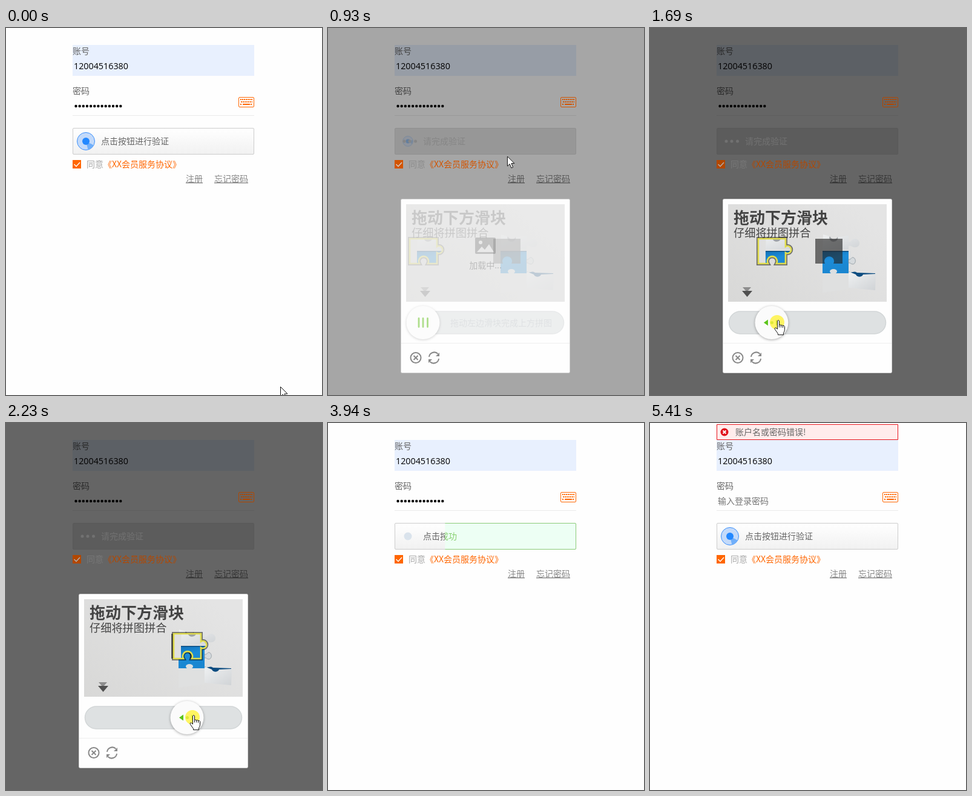
Write an HTML page that moves like this. It is 522 by 606 pixels and loops after 5.5 s.

```html
<!DOCTYPE html>
<html lang="zh">
<head>
<meta charset="utf-8">
<style>
html, body { margin: 0; width: 100%; height: 100%; overflow: hidden; background: #fefefe; }
svg { display: block; width: 522px; height: 606px; font: 14px "Noto Sans CJK SC", sans-serif; fill: #666; }
.orange { fill: #f60; }
.line { fill: none; stroke-width: 2; }
.link { fill: #888; text-decoration: underline; }
#account { font: 14.3px "Open Sans", "Noto Sans", sans-serif; fill: #000; }
#knob circle { filter: drop-shadow(0 1px 2px #0005); }
</style>
</head>
<body>
<svg viewBox="0 0 522 606">
  <defs>
    <linearGradient id="button" x2="0" y2="1"><stop stop-color="#fff"/><stop offset="1" stop-color="#f1f1f1"/></linearGradient>
    <linearGradient id="paper" y1="1" x2="1" y2=".3"><stop stop-color="#d8d8d7"/><stop offset="1" stop-color="#e4e4e4"/></linearGradient>
    <linearGradient id="white" x2="1" y2="1"><stop stop-color="#eef0f1"/><stop offset="1" stop-color="#d0d3d6"/></linearGradient>
    <linearGradient id="blue" x2=".3" y2="1"><stop stop-color="#1273ba"/><stop offset=".4" stop-color="#1c8cd9"/><stop offset="1" stop-color="#1a86d0"/></linearGradient>
    <clipPath id="wipe"><rect id="wipeBox" y="165" width="300" height="44"/></clipPath>
    <path id="tile" d="M135 348h45v13a6 6 0 1 1 0 10v18h-15a8 8 0 1 0-14 0h-16z"/>
    <clipPath id="tileClip"><use href="#tile"/></clipPath>
    <g id="scene">
      <path fill="url(#paper)" d="M129 291h262v161H129z"/>
      <path fill="url(#white)" d="M286 341l11 3a7 6 0 1 0 13 1l18-2v10c4 2 5-6 12-5 8 2 8 13 0 14-6 1-8-4-12-2v6h-43z"/>
      <path fill="#9ea2a5" d="M297 344a7 6 0 1 0 13 1c-3 5-9 6-13-1z"/>
      <path fill="#dfe0e0" d="M285 405h43v26l-43 6z"/>
      <path fill="url(#white)" d="M328 404l45 1-1 28-44-4z"/>
      <path fill="url(#blue)" d="M285 369h43v36h-43z"/>
      <path fill="#d5dadd" stroke="#8b959c" stroke-width=".8" d="M328 382c5 1 4-4 8-3 5 2 4 11-1 11-4 0-3-3-7-2z"/>
      <path fill="#0d4c80" d="M285 368h43v1.500h-43zM328 402c5 4 8-2 14 2l30 1v1l-20 1c-2 5-10 5-12 0z"/>
      <ellipse cx="303" cy="402" rx="6" ry="4" fill="#dcdfe1"/>
    </g>
  </defs>

  <g id="page">
    <path fill="#e8f0fe" d="M110 28h300v51H110z"/>
    <text x="110" y="43">账号</text>
    <text id="account" x="112" y="68">12004516380</text>
    <text x="110" y="109">密码</text>
    <g id="dots" fill="#000"></g>
    <text id="hint" x="112" y="134" fill="#757575">输入登录密码</text>
    <path fill="#ebebeb" d="M110 144h300v1H110z"/>
    <rect id="face" x="110.5" y="165.5" width="299" height="43" rx="1.5"/>
    <g id="radar">
      <circle r="14.5" fill="#c3dafa" stroke="#3a8ffb"/>
      <path id="beam" fill="#70affa" d="M0 0L13.2-6A14.5 14.5 0 0 1 13.2 6z"/>
      <circle r="6" fill="#2388ff"/>
    </g>
    <circle id="seed" cx="132" cy="187" r="6.5" fill="#dae3ec"/>
    <text id="prompt" x="157" y="192">点击按钮进行验证</text>
    <g id="passed" clip-path="url(#wipe)">
      <rect x="110.5" y="165.5" width="299" height="43" rx="1.5" fill="#edfff4" stroke="#8acb78"/>
      <circle cx="132" cy="187" r="10" class="line" stroke="#86cf6e"/>
      <path d="M127 187l4 4 7-8" class="line" stroke="#86cf6e"/>
      <text x="157" y="192" fill="#86cf6e">验证成功</text>
    </g>
    <text x="297" y="254" class="link">注册</text>
    <text x="344" y="254" class="link">忘记密码</text>
    <g id="error">
      <path fill="#ffecec" stroke="#e8141c" d="M110.5 2.5h299v25h-299z"/>
      <circle cx="123" cy="15" r="6.5" fill="#e1101a"/>
      <path class="line" stroke="#fff" d="M120.5 12.5l5 5m0-5l-5 5"/>
      <text x="141" y="20">账户名或密码错误!</text>
    </g>
  </g>

  <rect id="shade" width="522" height="606" fill="#000"/>
  <g id="accents" class="orange">
    <g id="waiting" fill="#a2a2a2">
      <circle cx="126" cy="187" r="2.5"/><circle cx="135" cy="187" r="2.5"/><circle cx="144.500" cy="187" r="2.5"/>
      <text x="157" y="192">请完成验证</text>
    </g>
    <rect x="384.500" y="114.500" width="25" height="16" rx="1.5" fill="none" stroke="#f60"/>
    <path fill="none" stroke="#f60" stroke-width="2" stroke-dasharray="2 1" d="M387 118h20M388 122h19M387 126h3M404 126h3"/>
    <path d="M391 125h12v2h-12zM110 218h14v14h-14z"/>
    <path fill="none" stroke="#fff" stroke-width="1.4" d="M112.500 225l3.500 3.500 6-6.500"/>
    <text x="133" y="230" fill="#aaa">同意</text><text x="161" y="230">《XX会员服务协议》</text>
  </g>

  <g id="modal">
    <rect x="120.500" y="282.500" width="279" height="287" rx="2" fill="#fefefe" stroke="#d1d1d1"/>
    <path fill="#ececec" d="M129 291h262v161H129z"/>
    <path fill="#bdbdbd" fill-rule="evenodd" d="M245 346h30q2 0 2 2v23q0 2-2 2h-30q-2 0-2-2v-23q0-2 2-2zm1 24h28l-8-13-7 9-5-5zm3-16a3 3 0 1 0 6 0 3 3 0 1 0-6 0z"/>
    <text x="260" y="397" text-anchor="middle" fill="#b5b5b5">加载中...</text>
    <g id="picture">
      <use href="#scene"/>
      <text x="138" y="322.500" font-size="26" font-weight="700" fill="#444">拖动下方滑块</text>
      <text x="138" y="344.500" font-size="18.2" fill="#444">仔细将拼图拼合</text>
      <path fill="#8d8d8d" d="M153 428h14l-7 8z"/><path fill="#505050" d="M152 434h17l-8.500 10z"/>
      <g id="puzzle">
        <path fill="#222" fill-opacity=".62" d="M273 348h45v41h-15a8 8 0 1 0-14 0h-16z"/>
        <g id="piece">
          <use href="#tile" fill="none" stroke="#000" stroke-opacity=".5" stroke-width="6"/>
          <g clip-path="url(#tileClip)"><use href="#scene" x="-138"/></g>
          <use href="#tile" fill="none" stroke="#e0dc4c" stroke-width="2.600"/>
        </g>
      </g>
      <path id="result" fill="#68c07a" d="M129 450h262v2H129z"/>
    </g>
    <g id="slider">
      <rect x="130.500" y="468" width="259" height="37" rx="18.500" fill="#dee1e2" stroke="#d2d6d7" stroke-width="1.500"/>
      <text id="tip" x="202" y="491.500" fill="#98a0a6">拖动左边滑块完成上方拼图</text>
      <g id="knob">
        <circle cx="157" cy="486.500" r="27.500" fill="#fbfbfb"/>
        <path id="bars" stroke="#61bf1b" stroke-width="2.800" stroke-linecap="round" d="M150 479.500v14m7-14v14m7.500-14v14"/>
        <path id="arrows" fill="#5cc41a" d="M144 486.500l7-5v10zM171 486.500l-7-5v10zM155 486.500a2.500 2.500 0 1 0 5 0 2.500 2.500 0 1 0-5 0z"/>
      </g>
    </g>
    <path fill="#eee" d="M121 520h278v1H121z"/>
    <g class="line" stroke="#888">
      <circle cx="145" cy="544.500" r="8.500"/>
      <path d="M141.500 541l7 7m0-7l-7 7M167 543a8.500 8.500 0 0 1 14.500-5M183 546a8.500 8.500 0 0 1-14.500 5"/>
      <path fill="#888" stroke="none" d="M184 536v6h-6zM166 553v-6h6z"/>
    </g>
  </g>

  <circle id="press" r="12" fill="#fff23c" fill-opacity=".8"/>
  <g id="cursor" fill="#fff" stroke="#111" stroke-linejoin="round">
    <path id="arrow" d="M.5.5v16l3.800-3.500 2.700 6.500 2.700-1.100-2.700-6.400h5z"/>
    <path id="hand" transform="translate(1.500 -2.500)" d="M-1 0q1.500-2 3 0v7q1.500-1.200 3 .4 1.500-1 3 .6 2-.6 3 1.200v6q-.5 3-2 5v3H0v-2l-5-7q-1-2.500 1-3l3 2.500zM2 7v4m3-3.500V11m3-3v3.500"/>
  </g>
</svg>
<script>
const LOOP = 5500, STEP = 77.3;
const el = Object.fromEntries([...document.querySelectorAll('[id]')].map(e => [e.id, e]));

for (let i = 0; i < 13; i++)
  el.dots.insertAdjacentHTML('beforeend', `<circle cx="${115.5 + i * 6.15}" cy="129" r="2.2"/>`);

// Linear value between keys given as [time, value]
function at(t, keys) {
  const i = keys.findIndex(k => k[0] > t);
  if (i < 0) return keys[keys.length - 1][1];
  if (!i) return keys[0][1];
  const [t0, a] = keys[i - 1], [t1, b] = keys[i];
  return a + (b - a) * (t - t0) / (t1 - t0);
}
const path = [[0, 453, 592], [70, 451, 582], [300, 390, 360], [610, 300, 190], [760, 300, 190],
  [920, 296, 211], [1075, 241, 497], [1230, 166, 488], [3100, 308, 486], [3240, 455, 581], [3560, 455, 585]];
const axis = n => path.map(p => [p[0], p[n]]);
const pathX = axis(1), pathY = axis(2);
const within = (t, from, to) => t >= from && t < to;
const progress = (t, from, length) => Math.min(1, Math.max(0, (t - from) / length));
const fade = (name, value) => el[name].setAttribute('opacity', +value);
const move = (name, value) => el[name].setAttribute('transform', value);

function draw(t) {
  const u = progress(t, 1390, 820), slide = 142 * u * u * (3 - 2 * u);
  const held = within(t, 1300, 3090), dragging = within(t, 1300, 2620);
  const x = held ? 166 + slide : at(t, pathX), y = held ? 486 : at(t, pathY);
  const hand = held || within(t, 600, 830);

  // Login form
  const waiting = within(t, 830, 3460), failed = t >= 4410;
  fade('dots', !failed); fade('hint', failed); fade('error', failed);
  el.face.setAttribute('fill', waiting ? '#e8e8e8' : 'url(#button)');
  el.face.setAttribute('stroke', waiting ? '#ddd' : '#ccc');
  fade('prompt', !waiting);
  fade('waiting', waiting);
  fade('radar', t < 830 || t >= 4870 ? 1 : within(t, 830, 1000) ? .4 : 0);
  const size = t < 2000 ? at(t, [[680, 1], [920, .58]]) : at(t, [[4870, .4], [5180, 1]]);
  move('radar', `translate(132 187) scale(${size})`);
  const angle = t < 3700 ? Math.atan2(y - 187, x - 132) * 180 / Math.PI : 52;
  move('beam', `rotate(${angle})`);
  fade('seed', within(t, 3460, 4870));
  const w = progress(t, 3760, 370);
  el.wipeBox.setAttribute('x', 110 + 300 * (1 - w) ** 2);
  fade('passed', within(t, 3780, 4870));

  // Dialog
  const shade = at(t, [[680, 0], [760, .06], [920, .35], [1075, .55], [1150, .6], [3240, .6], [3550, 0]]);
  fade('shade', shade);
  el.accents.style.filter = `brightness(${1 - shade / 2})`;
  fade('modal', at(t, [[680, 0], [840, 1], [3240, 1], [3470, 0]]));
  fade('picture', at(t, [[840, 0], [920, .2], [1075, .8], [1220, 1]]));
  fade('slider', at(t, [[760, 0], [920, .5], [1075, .9], [1220, 1]]));
  fade('tip', at(t, [[920, .4], [1075, 1], [1300, 1], [1540, 0]]));
  fade('puzzle', at(t, [[2600, 1], [2900, 0]]));
  fade('result', at(t, [[2700, 0], [2920, 1]]));
  fade('arrows', dragging); fade('bars', !dragging);
  move('knob', `translate(${slide})`);
  move('piece', `translate(${slide})`);

  // Pointer
  fade('press', dragging || within(t, 680, 830));
  move('press', `translate(${x} ${y})`);
  move('cursor', `translate(${x} ${y})`);
  fade('cursor', t < 3780);
  fade('hand', hand); fade('arrow', !hand);
}

function frame() {
  const t = performance.now() % LOOP;
  draw(t < 70 ? 0 : 70 + STEP * Math.floor((t - 58) / STEP));
  requestAnimationFrame(frame);
}
frame();
</script>
</body>
</html>
```
